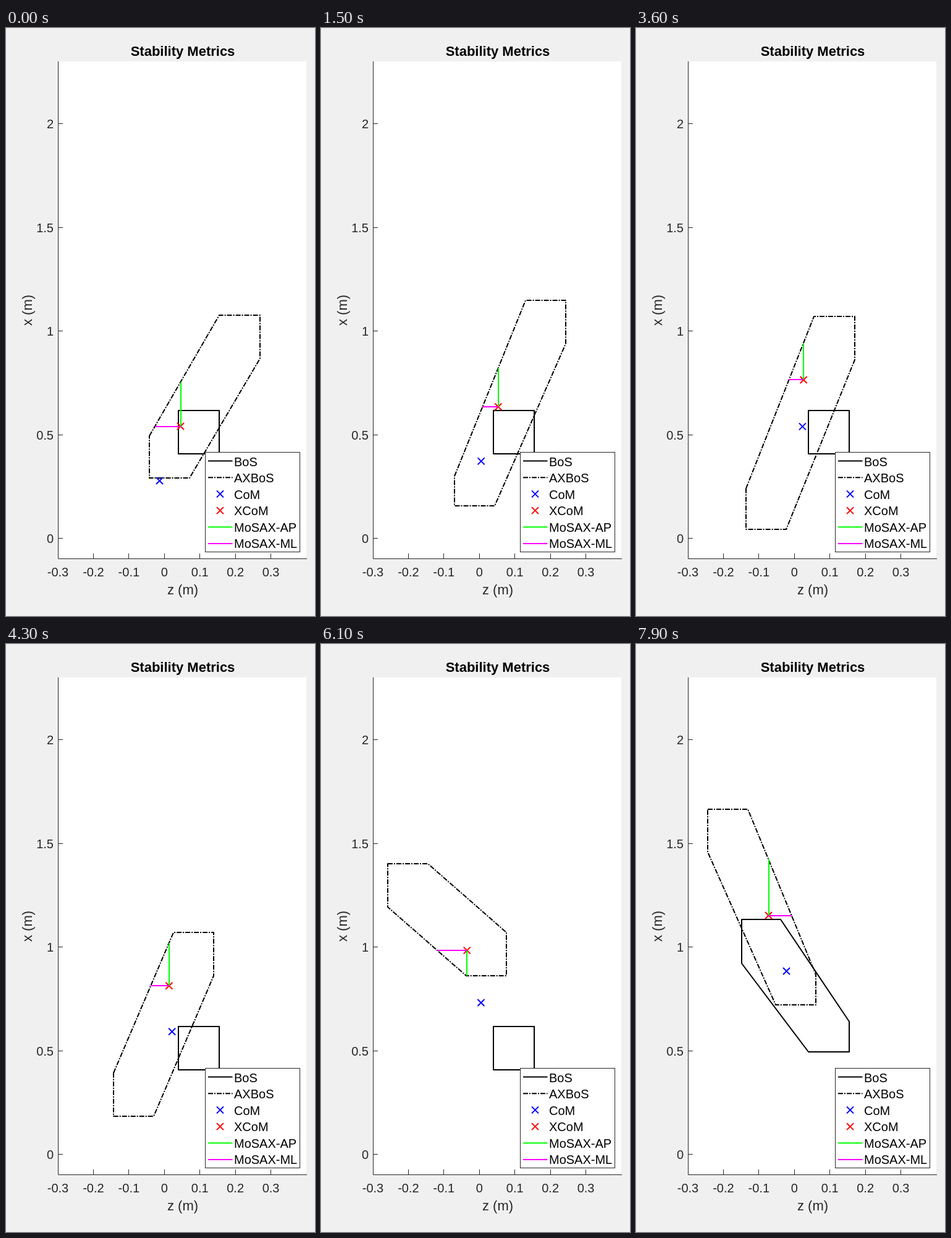
An HTML page for the animation above (8 s loop, 500 px wide and 950 px high).

```html
<!DOCTYPE html>
<html lang="en">
<head>
<meta charset="utf-8">
<title>Stability Metrics</title>
<style>
  html, body { margin: 0; width: 100%; height: 100%; overflow: hidden; background: #f0f0f0; }
  svg { display: block; width: 500px; height: 950px; font: 20px "Liberation Sans", Arial, sans-serif; }
  .axis { fill: none; stroke: #262626; }
  .label { fill: #262626; }
  .big { font-size: 22px; text-anchor: middle; }
  .line { fill: none; stroke-width: 2; stroke-linejoin: round; }
  .dash { stroke-dasharray: 8 2 2 2; }
</style>
</head>
<body>
<svg viewBox="0 0 500 950">
  <rect x="84" y="54" width="402" height="803" fill="#fff"/>
  <path class="axis" d="M84.5 54V857.5H487"/>
  <text class="big" x="286" y="45" font-weight="bold">Stability Metrics</text>
  <text class="big label" x="286" y="915">z (m)</text>
  <text class="big label" transform="translate(42 456) rotate(-90)">x (m)</text>
  <g id="ticks"></g>
  <g id="plot"></g>
  <rect class="axis" x="322.5" y="685.5" width="153" height="161" style="fill:#fff"/>
  <g id="legend"></g>
</svg>
<script>
const LOOP = 8000, STEP = 100, HOLD = 500, LAST = 75, HEEL_STRIKE = 62;
const $ = id => document.getElementById(id);

function add(parent, tag, attrs, text = '') {
  const el = document.createElementNS('http://www.w3.org/2000/svg', tag);
  for (const name in attrs) el.setAttribute(name, attrs[name]);
  el.textContent = text;
  return parent.appendChild(el);
}
const cross = ([x, y]) => `M${x - 5.5} ${y - 5.5}l11 11m0 -11l-11 11`;
const segment = (a, b) => `M${a.map(Math.round)}L${b.map(Math.round)}`;
const outline = points => `M${points.join('L')}Z`;

// Axis ticks
for (let i = 0; i < 7; i++) {
  const x = 84 + i * 402 / 7;
  add($('ticks'), 'path', { class: 'axis', d: `M${Math.floor(x) + .5} 857v-8` });
  add($('ticks'), 'text', { class: 'label', x, y: 886, 'text-anchor': 'middle' }, String((i - 3) / 10));
}
for (let i = 0; i < 5; i++) {
  const y = 824.5 - i * 167.5;
  add($('ticks'), 'path', { class: 'axis', d: `M84 ${Math.floor(y) + .5}h8` });
  add($('ticks'), 'text', { class: 'label', x: 77, y: y + 7.5, 'text-anchor': 'end' }, String(i / 2));
}

// Plotted series and their legend rows
const series = [
  ['BoS', '#000'], ['AXBoS', '#000', 'dash'], ['CoM', '#00f', 'mark'],
  ['XCoM', '#f00', 'mark'], ['MoSAX-AP', '#0f0'], ['MoSAX-ML', '#f0f']
];
const paths = series.map(([name, stroke, kind = ''], i) => {
  const y = 699.5 + i * 26.7, look = { class: `line ${kind}`, stroke };
  add($('legend'), 'path', { ...look, d: kind === 'mark' ? cross([346.5, y]) : `M327 ${y}h39.5` });
  add($('legend'), 'text', { x: 369, y: 708 + i * 26.4 }, name);
  return add($('plot'), 'path', look);
});

// Motion rules, all in terms of the step number
const bump = (step, centre, width) => Math.exp(-(((step - centre) / width) ** 2));
const riseFrom = (step, begin, power) => (Math.max(0, step - begin) / (LAST - begin)) ** power;

// Straight drift plus a few sine harmonics
function sway(step, from, to, ...harmonics) {
  const u = step / LAST;
  return harmonics.reduce((sum, size, n) => sum + size * Math.sin((n + 1) * Math.PI * u), from + (to - from) * u);
}

// Monotone cubic through key poses [step, ...values]
function spline(keys, step) {
  const last = keys.length - 2;
  let i = 0;
  while (i < last && step > keys[i + 1][0]) i++;
  const span = keys[i + 1][0] - keys[i][0], u = (step - keys[i][0]) / span;
  return keys[i].slice(1).map((from, n) => {
    const rate = j => (keys[j + 1][n + 1] - keys[j][n + 1]) / (keys[j + 1][0] - keys[j][0]);
    const tangent = j => {
      if (j === 0 || j > last) return rate(Math.min(j, last));
      const p = rate(j - 1), q = rate(j);
      return p * q > 0 ? 2 * p * q / (p + q) : 0;
    };
    const delta = rate(i) * span, m0 = tangent(i) * span, m1 = tangent(i + 1) * span;
    return from + u * (m0 + u * (3 * delta - 2 * m0 - m1 + u * (m0 + m1 - 2 * delta)));
  });
}

const com = step => [
  sway(step, 248.5, 243.5, 23, 1.5),
  sway(step, 731.5, 528.5, 0, -2.3)
];
const xcom = step => [
  sway(step, 282.5, 214.5, 17, 6, 0, 2),
  sway(step, 643.5, 438.5, 11, -3, -4)
];

// Feet are boxes [x, y, width, height]; the rear heel lifts after the heel strike
function rearFoot(step) {
  const lift = riseFrom(step, HEEL_STRIKE, 1.6);
  return [279, 618 - 8.5 * lift, 65.5, 70 - 21 * lift];
}
const frontFoot = () => [170.5, 445, 63.5, 70.5];

const stanceShift = [[0, 66], [11, 51.5], [32, 9], [47, -26], [67, -54], [75, -53.5]];
function stanceReach(step) {
  const [x, y, w, h] = rearFoot(step);
  const ahead = -152 - 26 * bump(step, 11, 7) + 76 * riseFrom(step, 58, 2);
  return [x + spline(stanceShift, step)[0], y + ahead, w, h];
}

const swingPath = [[0, 232, 659], [11, 216, 724], [19, 176.5, 748], [27, 177, 758], [36, 178.5, 720],
  [47, 141, 571], [54, 114.5, 398], [60, 104.5, 325], [67, 113, 282.5], [75, 115.5, 266.5]];
const swingReach = step => [...spline(swingPath, step), 65, 70 - 32 * bump(step, 17, 10)];

const corners = ([x, y, w, h]) =>
  [[x, y], [x + w, y], [x + w, y + h], [x, y + h]].map(p => p.map(Math.round));

// Convex hull around a list of boxes
function hull(boxes) {
  const points = boxes.flatMap(corners).sort((p, q) => p[0] - q[0] || p[1] - q[1]);
  const chain = list => {
    const out = [];
    for (const p of list) {
      while (out.length > 1) {
        const [a, b] = out.slice(-2);
        if ((b[0] - a[0]) * (p[1] - a[1]) > (b[1] - a[1]) * (p[0] - a[0])) break;
        out.pop();
      }
      out.push(p);
    }
    return out.slice(0, -1);
  };
  return [...chain(points), ...chain([...points].reverse())];
}

// Nearest crossing of the polygon with the line through p along an axis (0: x, 1: y)
function nearestEdge(polygon, p, axis) {
  const other = 1 - axis;
  let best = p[axis], gap = Infinity;
  polygon.forEach((a, i) => {
    const b = polygon[(i + 1) % polygon.length];
    if ((a[other] > p[other]) === (b[other] > p[other])) return;
    const at = a[axis] + (p[other] - a[other]) / (b[other] - a[other]) * (b[axis] - a[axis]);
    if (Math.abs(at - p[axis]) < gap) [best, gap] = [at, Math.abs(at - p[axis])];
  });
  return axis ? [p[0], best] : [best, p[1]];
}

function draw(time) {
  const step = Math.max(0, Math.floor((time % LOOP - HOLD) / STEP) + 1);
  const grounded = step < HEEL_STRIKE ? [rearFoot] : [rearFoot, frontFoot];
  const base = hull(grounded.map(foot => foot(step)));
  const reach = hull([stanceReach(step), swingReach(step)]);
  const x = xcom(step);
  const shapes = [outline(base), outline(reach), cross(com(step)), cross(x),
    segment(x, nearestEdge(reach, x, 1)), segment(x, nearestEdge(reach, x, 0))];
  shapes.forEach((d, i) => paths[i].setAttribute('d', d));
}

const start = performance.now();
function tick() {
  draw(performance.now() - start);
  requestAnimationFrame(tick);
}
tick();
</script>
</body>
</html>
```
